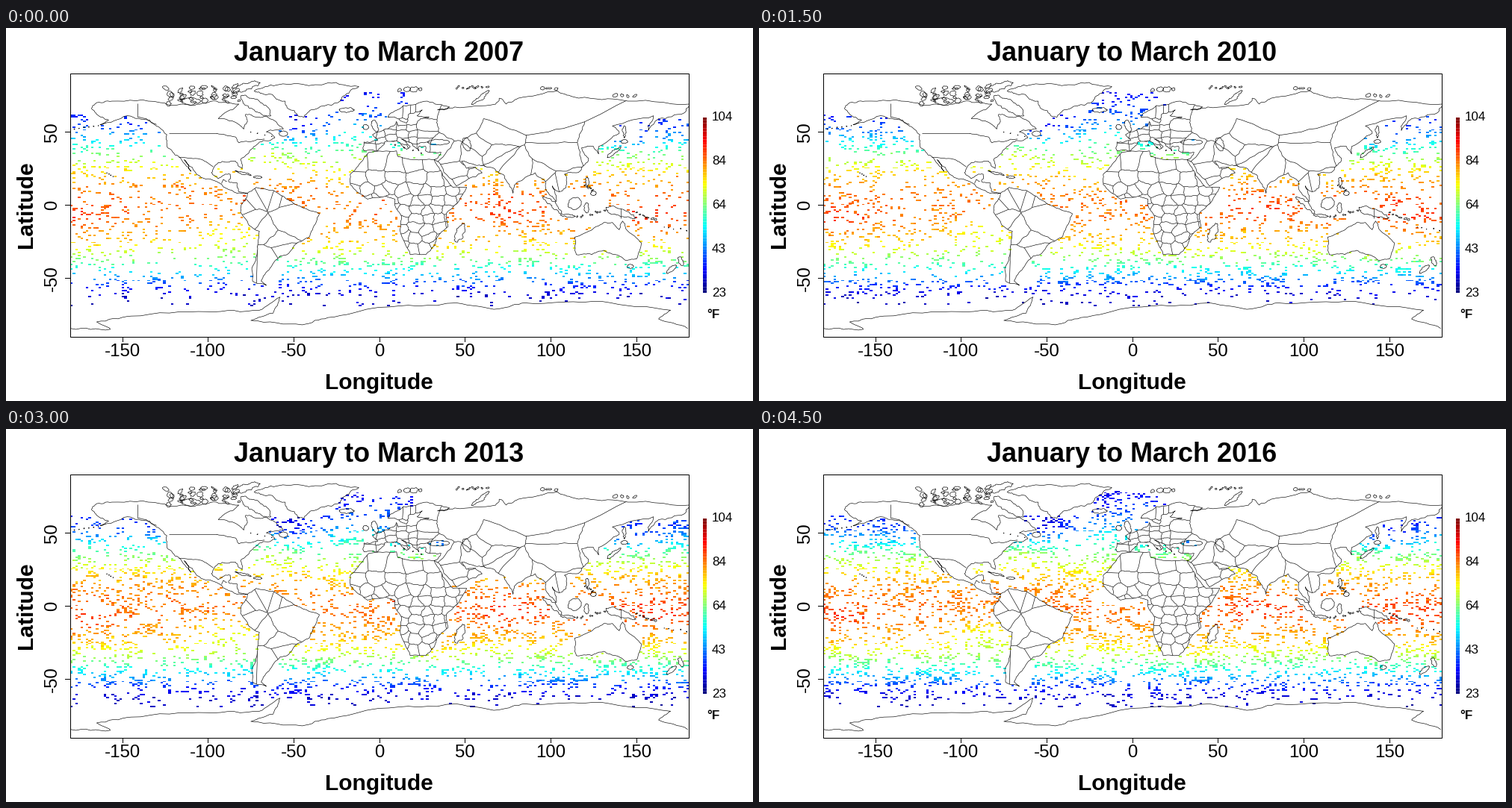
Animation, 1000 px wide and 500 px high, one loop 5 s. Source, as a matplotlib script:

```python
import numpy as np
import matplotlib.pyplot as plt
from matplotlib.animation import FuncAnimation
from matplotlib.collections import LineCollection
from matplotlib.colors import LinearSegmentedColormap
from matplotlib.patches import Rectangle
from matplotlib.path import Path

W, H, DPI = 1000, 500, 100
LEFT, RIGHT, TOP, BOTTOM = 86, 914, 61, 414
NX, NY = 240, 180
T_MIN, T_MAX = 23, 104
jet = LinearSegmentedColormap.from_list("jet9", [
    "#00007F", "#0000FF", "#007FFF", "#00FFFF", "#7FFF7F",
    "#FFFF00", "#FF7F00", "#FF0000", "#7F0000"])
rng = np.random.default_rng(4)

plt.rcParams["font.family"] = "Liberation Sans"
fig = plt.figure(figsize=(W / DPI, H / DPI), dpi=DPI, facecolor="white")
ax = fig.add_axes([0, 0, 1, 1])
masks = []


def px(lon):
    return 499.8 + 2.2936 * lon


def py(lat):
    return 237.2 - 1.96 * lat


def to_px(p):
    return np.column_stack([px(p[:, 0]), py(p[:, 1])])


def pts(*v):
    return np.reshape(v, (-1, 2)).astype(float)


def rough(p, amp, levels=3):
    """Midpoint displacement, to give lines a natural edge."""
    for _ in range(levels):
        d = np.diff(p, axis=0)
        size = np.hypot(*d.T) + 1e-6
        shift = rng.uniform(-amp, amp, len(d)) * np.minimum(size, 5) / size
        out = np.empty((2 * len(p) - 1, 2))
        out[::2] = p
        out[1::2] = p[:-1] + d / 2 + np.column_stack([-d[:, 1], d[:, 0]]) * shift[:, None]
        p = out
    return p


def draw(curves, clip=None):
    lines = LineCollection([to_px(c) for c in curves], colors="black",
                           linewidths=.45, zorder=2)
    ax.add_collection(lines)
    if clip is None:
        lines.set_clip_path(frame)
    else:
        lines.set_clip_path(Path(to_px(clip)), ax.transData)


def land(p, amp=.16, levels=3):
    p = rough(np.vstack([p, p[:1]]), amp, levels)
    draw([p])
    masks.append(Path(p))
    return p


def ellipse(x, y, rx, ry, tilt=0, n=10):
    a = np.linspace(0, 2 * np.pi, n, endpoint=False)
    t = np.radians(tilt)
    u, v = rx * np.cos(a), ry * np.sin(a)
    return np.column_stack([x + u * np.cos(t) - v * np.sin(t),
                            y + u * np.sin(t) + v * np.cos(t)])


def chain(x0, y0, x1, y1, n, size, spread):
    """Small islands scattered along a line."""
    for x, y in zip(np.linspace(x0, x1, n), np.linspace(y0, y1, n)):
        rx, ry = size * rng.uniform(.3, 1, 2)
        dx, dy = rng.normal(0, spread, 2)
        land(ellipse(x + dx, y + dy, rx, ry * .7, rng.uniform(-60, 60), 6), .25, 2)


def jittered(x0, x1, dx, y0, y1, dy):
    x, y = np.meshgrid(np.arange(x0, x1, dx), np.arange(y0, y1, dy))
    x = x + rng.uniform(-.3, .3, x.shape) * dx
    y = y + rng.uniform(-.3, .3, y.shape) * dy
    return np.column_stack([x.ravel(), y.ravel(), 0 * x.ravel()])


def nations(seeds, clip, merged=1):
    """Borders as edges of a power diagram of (lon, lat, reach);
    the first `merged` seeds belong to one country."""
    c, r = seeds[:, :2], seeds[:, 2]
    h = (c ** 2).sum(1) - r ** 2
    edges = []
    for i in range(len(c)):
        for j in range(max(i + 1, merged if i < merged else 0), len(c)):
            d = c[j] - c[i]
            foot = c[i] + d * (h[j] - h[i] - 2 * c[i] @ d) / (2 * d @ d)
            u = np.array([-d[1], d[0]]) / np.hypot(*d)
            lo, hi = -90, 90
            for k in set(range(len(c))) - {i, j}:
                slope = 2 * u @ (c[k] - c[i])
                room = h[k] - h[i] - 2 * foot @ (c[k] - c[i])
                if slope > 0:
                    hi = min(hi, room / slope)
                elif slope < 0:
                    lo = max(lo, room / slope)
            if lo < hi:
                edges.append(rough(np.array([foot + lo * u, foot + hi * u]), .13))
    draw(edges, clip)


frame = Rectangle((LEFT - .5, TOP - .5), RIGHT - LEFT, BOTTOM - TOP,
                  fill=False, ec="black", lw=.72, zorder=3)
ax.add_patch(frame)

# Continents: a few key points each
america_n = pts(
    -168, 66, -166, 69, -156, 71, -128, 70, -108, 68, -95, 71, -82, 69, -87, 65, -94, 59,
    -82, 55, -79, 52, -77, 57, -78, 62, -70, 60, -65, 60, -56, 52, -66, 50, -61, 46,
    -70, 43, -76, 36, -81, 31, -80, 25, -84, 30, -94, 29, -98, 22, -94, 18, -90, 21,
    -87, 21, -88, 16, -83, 15, -82, 9, -77, 8, -83, 8, -95, 16, -105, 20, -114, 31,
    -110, 23, -117, 33, -124, 40, -124, 48, -134, 58, -147, 61, -163, 55, -158, 58, -165, 62)
america_s = pts(
    -77, 8, -72, 12, -62, 10, -50, 1, -35, -6, -39, -17, -41, -22, -48, -26, -54, -34,
    -58, -35, -62, -40, -66, -46, -69, -52, -66, -55, -74, -52, -74, -42, -71, -30,
    -70, -18, -76, -14, -81, -5, -80, 1)
africa = pts(
    -6, 36, 10, 37, 11, 33, 20, 31, 32, 31, 37, 20, 43, 12, 51, 12, 46, 2, 39, -6, 40, -15,
    35, -20, 32, -28, 27, -34, 18, -34, 12, -17, 13, -8, 9, 0, 9, 4, 4, 6, -7, 4, -13, 9,
    -17, 14, -17, 21, -10, 30)
europe = pts(
    32, 31, 36, 36, 27, 37, 27, 40, 23, 40, 23, 37, 19, 42, 13, 45, 18, 40, 16, 38, 10, 44,
    3, 43, -1, 37, -9, 37, -9, 43, -1, 44, -4, 48, 8, 54, 10, 57, 11, 54, 21, 55, 24, 59,
    29, 60, 22, 61, 25, 65, 17, 62, 16, 56, 11, 59, 5, 60, 14, 68, 28, 71, 41, 67, 34, 65)
asia = pts(
    44, 67, 68, 69, 70, 73, 74, 69, 81, 73, 104, 78, 113, 74, 140, 72, 181, 69, 178, 63,
    163, 59, 157, 51, 160, 61, 136, 54, 140, 49, 128, 40, 128, 35, 125, 40, 118, 39,
    122, 32, 117, 23, 108, 21, 109, 12, 105, 9, 101, 13, 103, 2, 98, 9, 97, 16, 91, 22,
    80, 15, 78, 8, 73, 20, 67, 25, 57, 27, 48, 30, 51, 25, 56, 26, 60, 22, 45, 13, 35, 29)
australia = pts(
    114, -22, 122, -18, 131, -12, 136, -12, 140, -17, 142, -11, 146, -19, 153, -26,
    150, -37, 144, -38, 138, -34, 131, -31, 124, -34, 115, -34)
greenland = pts(
    -73, 78, -60, 82, -30, 83.5, -12, 81, -20, 75, -24, 70, -40, 65, -44, 60, -52, 65,
    -55, 71, -68, 76)
ice = pts(
    -180, -84.5, -157, -85, -165, -80, -145, -76, -100, -73, -70, -72, -58, -63, -62, -74,
    -75, -79, -45, -82, -30, -77, 0, -70, 45, -67, 70, -71, 85, -67, 130, -66, 170, -72,
    163, -78, 180, -84.5)

land(america_n)
south = land(america_s, .1)
africa = land(africa, .08)
eurasia = land(np.vstack([europe, asia]))
land(australia, .12)
land(greenland, .2)
ice = rough(ice, .13)
draw([ice])
masks.append(Path(np.vstack([ice, [[180, -90], [-180, -90]]])))

# Larger islands: lon, lat, radii, tilt
for isle in [(47, -19, 2, 7, -18), (-2.5, 54, 1.6, 4.2, 15), (-8, 53.3, 1.7, 1.8, 0),
             (-19, 65, 4.5, 1.4, 0), (176, -38.5, 1.4, 3.2, 20), (170.5, -44, 4, 1.2, 45),
             (137, 36, 5.4, 1.2, 42), (143, 43.4, 2, 1.3, 0), (143, 50, .9, 4.2, 0),
             (114, 1, 3.8, 4.2, -30), (101, 0, 7.8, 1.6, -46), (110, -7.3, 4.5, .7, -8),
             (121, -2, 1.3, 3.6, 0), (141, -5.3, 9.5, 2.2, -22), (121.3, 16, 1.1, 3, 0),
             (125, 8, 1.7, 1.6, 0), (-79.5, 21.8, 5, .6, -18), (-71, 19, 2.5, .8, 0),
             (-56, 48.7, 2.5, 1.8, 0), (146.5, -42, 1.8, 1.4, 0), (59, 73.5, 7, 1.2, 42),
             (-72, 68, 11, 3.2, -38), (-110, 71, 6, 2.2, 0), (-78, 80.5, 9, 2.4, 20)]:
    land(ellipse(*isle), .25)
black_sea = land(ellipse(34.5, 43, 6.5, 2, 0), .1)
masks.pop()
land(ellipse(51, 41.5, 2.2, 4.8, 15), .2)

# Archipelagos
for row in range(5):
    chain(-122, 71 + 2.2 * row, -84, 71.5 + 2.4 * row, 7, 2.6, .8)
chain(-178, 51.8, -164, 54.3, 6, .5, .1)
chain(116, -8.5, 131, -4, 9, 1, .8)
chain(120, 13, 124, 10, 5, .9, .5)
chain(150, -5.5, 161, -10, 6, 1.1, .3)
chain(166, -15, 179, -18, 5, .5, .8)
chain(-159, 21.8, -155.5, 19.6, 4, .4, .1)
chain(12, 78.5, 24, 79.5, 4, 2.8, .5)
chain(46, 80.5, 63, 80.7, 7, 1.6, .3)
chain(95, 80, 103, 78.8, 3, 2.4, .3)
chain(138, 75.5, 149, 74.5, 4, 2, .4)
chain(9, 41, 25, 35.3, 4, 1, .3)
chain(-75, 50, -63, 47, 4, .4, .2)

# Borders
draw([pts(-141, 69.7, -141, 60.3), pts(-122.8, 49, -95, 49)])
draw([rough(pts(-141, 60, -136, 59, -130, 55), .1),
      rough(pts(-95, 49, -84, 46.5, -82, 42.5, -71, 45, -67, 45), .1),
      rough(pts(-117, 32.5, -106, 31.7, -101, 29.5, -97, 26), .08),
      rough(pts(-92, 14.6, -91, 17.5, -89, 16), .1),
      rough(pts(141, -2.6, 141, -9), 0)])
nations(np.array([
    (-51, -10, 9), (-65, -38, 4), (-76, -38, 0), (-76, -9, 0), (-65, -17, 0), (-73, 4, 0),
    (-66, 7, 0), (-59, 5, 0), (-55, 4, 0), (-58, -23, 0), (-56, -33, 0), (-79, -1, 0)]), south)
nations(np.vstack([jittered(-14, 52, 7, -29, 12, 6.5), jittered(-12, 48, 11, 17, 36, 10)]), africa)
nations(np.vstack([
    [(90, 98, 47), (46, 57, 8), (67, 48, 0), (104, 46, 0), (104, 34, 8), (79, 22, 6),
     (69, 29, 0), (53, 32, 4), (34, 39, 0), (43, 33, 0), (45, 24, 4), (48, 15, 0),
     (57, 20, 0), (59, 39, 0), (66, 34, 0), (96, 21, 0), (101, 15.5, 0), (107, 17, 0),
     (127, 39, 0), (10, 64, 0), (17, 64, 0), (26, 64, 0)],
    jittered(-5, 31, 6, 40, 58, 4.5)]), eurasia, merged=2)

# Sea grid: temperature and data density
lon, lat = np.meshgrid(-180 + (np.arange(NX) + .5) * 360 / NX,
                       90 - (np.arange(NY) + .5) * 180 / NY)
cells = np.column_stack([lon.ravel(), lat.ravel()])


def inside(path):
    return path.contains_points(cells).reshape(lon.shape)


def bump(x, y, sx, sy, amp):
    return amp * np.exp(-((lon - x) / sx) ** 2 - ((lat - y) / sy) ** 2)


def box(x0, x1, y0, y1):
    return (lon > x0) & (lon < x1) & (lat > y0) & (lat < y1)


temp = np.interp(lat, [-70, -61, -55, -45, -39, -32, -24, -8, 5, 13, 22, 29, 36, 48, 54, 62, 80],
                 [28, 30, 37, 52, 61, 70, 78, 84, 84, 82, 77, 70, 62, 46, 39, 36, 31])
for b in [(-85, -20, 20, 12, -8), (-52, 56, 11, 9, -8), (-12, 52, 19, 13, 9),
          (148, 46, 18, 7, -8), (160, -5, 30, 12, 5), (75, -3, 25, 10, 5),
          (-175, -8, 22, 10, 5), (-20, 20, 13, 9, -4), (35, 43, 7, 4, -10),
          (-65, 36, 13, 5, 6), (5, 70, 12, 7, 5), (35, -32, 9, 8, 4)]:
    temp += bump(*b)

sea = (lat < 79) & (lat > -69)
for m in masks:
    sea &= ~inside(m)
sea |= inside(Path(black_sea))
# Seas without floats
for b in [(-128, -64, 50, 90), (-180, -25, 62, 90), (20, 180, 61, 90), (9, 31, 53, 66),
          (32, 56, 14, 31), (99, 133, -9, 6), (99, 109, 5, 16), (117, 127, 31, 42),
          (-69, -59, -55, -38), (124, 143, -19, -6), (-95, -77, 41, 50)]:
    sea &= ~box(*b)

weight = (1 - bump(-112, -32, 32, 14, .45) + bump(65, 15, 12, 10, .5)
          + bump(20, 38, 20, 5, .6) + bump(145, 28, 20, 10, .3))
weight[lat < -56] *= .75
weight[lat < -64] *= .35
weight[box(-98, -62, 9, 31)] *= .5
weight[box(136, 160, 44, 61)] *= .5


def observations(year):
    """One season of float readings as an RGBA grid."""
    r = np.random.default_rng(year)
    share = np.interp(year, [2007, 2016], [.085, .165])
    patch = np.kron(r.gamma(4, .25, (NY // 6, NX // 6)), np.ones((6, 6)))
    hit = r.random(lon.shape) < share * weight * patch
    value = temp + r.normal(0, 1.6, lon.shape)
    rgba = jet((value - T_MIN) / (T_MAX - T_MIN))
    rgba[..., 3] = hit & sea
    return rgba


def label(x, y, s, size, bold=False, turn=0, ha="center"):
    return ax.text(x, y, s, fontsize=size * 72 / DPI, weight="bold" if bold else "normal",
                   rotation=turn, rotation_mode="anchor", ha=ha, va="baseline")


years = list(range(2007, 2017))
grids = [observations(y) for y in years]
dots = ax.imshow(grids[0], extent=(LEFT, RIGHT, BOTTOM, TOP), interpolation="nearest",
                 aspect="auto", zorder=1)

for v in range(-150, 151, 50):
    ax.plot([px(v)] * 2, [BOTTOM, BOTTOM + 6], color="black", lw=.72)
    label(px(v), 440, str(v), 24)
for v in (-50, 0, 50):
    ax.plot([LEFT - 7, LEFT - 1], [py(v)] * 2, color="black", lw=.72)
    label(68, py(v), str(v), 24, turn=90)

title = label(499, 44, "", 36, bold=True)
label(499.5, 484, "Longitude", 30, bold=True)
label(35, 237, "Latitude", 30, bold=True, turn=90)

STEPS = 64
step = 235 / STEPS
for k in range(STEPS):
    ax.add_patch(Rectangle((933, 355 - (k + 1) * step), 5, step,
                           fc=jet(k / (STEPS - 1)), ec="none", snap=False))
for k, v in enumerate((23, 43, 64, 84, 104)):
    label(945, 360 - 59 * k, str(v), 17, ha="left")
label(947, 389, "°F", 17, bold=True)

ax.set_xlim(0, W)
ax.set_ylim(H, 0)
ax.axis("off")


def update(i):
    dots.set_data(grids[i])
    title.set_text(f"January to March {years[i]}")
    return dots, title


anim = FuncAnimation(fig, update, frames=len(years), interval=500, repeat=True,
                     repeat_delay=0, blit=False)
plt.show()
```
